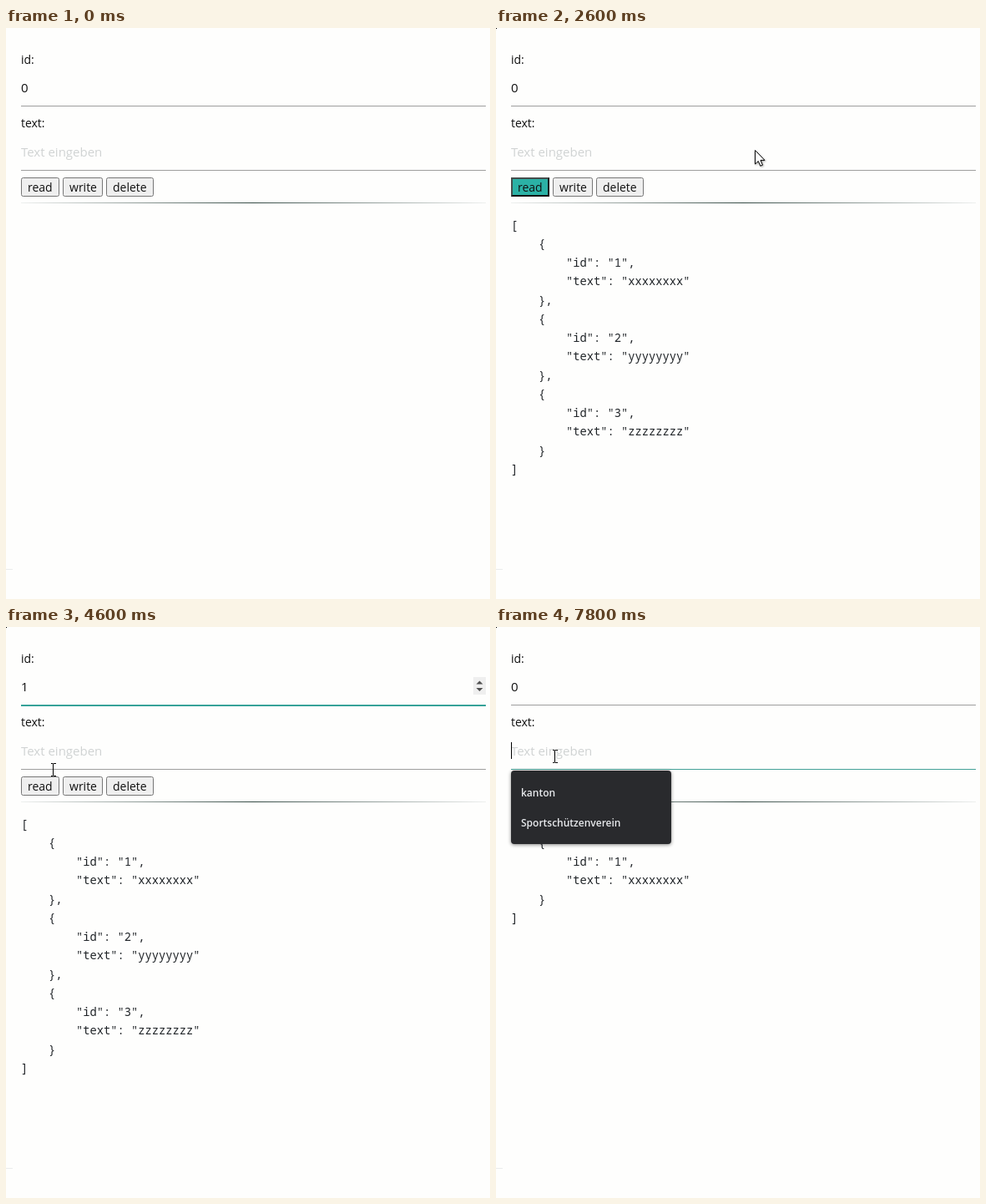
These frames come from a looping animation (580x684 px, 8000 ms). An HTML page:

```html
<!DOCTYPE html>
<html lang="de">
<head>
<meta charset="utf-8">
<title>Form demo</title>
<style>
html, body { margin: 0; width: 100%; height: 100%; overflow: hidden; background: #fefefd; }
.stage { position: relative; width: 580px; height: 684px; overflow: hidden; }
svg { position: absolute; left: 0; top: 0; }
text { font: 14px "Open Sans", "Noto Sans", sans-serif; fill: #111; }
.value { font-size: 15px; }
.hint { font-size: 15px; fill: #d0d3d3; }
.option { font-size: 12px; font-weight: 600; fill: #e8eaed; }
.button { fill: #efefef; stroke: #767676; }
pre {
  position: absolute; left: 18px; top: 224.5px; margin: 0;
  font: 13.75px/22.5px "Noto Sans Mono", "DejaVu Sans Mono", monospace; color: #212529;
}
.tail { top: 314.5px; }

/* Every state holds until the next key: 2.5% = 200 ms */
.anim { animation: 8s step-end infinite; }
.dot { animation-name: dot; }
.pressed { animation-name: pressed; }
.head { animation-name: head; }
.all { animation-name: all; }
.one { animation-name: one; }
.zero { animation-name: zero; }
.edited { animation-name: edited; }
.id-focus { animation-name: id-focus; }
.spin { animation-name: spin; }
.spin-up { animation-name: spin-up; }
.menu { animation-name: menu; }
.arrow { animation-name: arrow; }
.beam { animation-name: beam; }
.pointer { animation-name: move; }

@keyframes dot { 0%, 12.5% { visibility: hidden } 2.5%, 27.5%, 100% { visibility: visible } }
@keyframes pressed { 0%, 47.5%, 97.5%, 100% { visibility: hidden } 17.5%, 62.5% { visibility: visible } }
@keyframes head { 0% { visibility: hidden } 20%, 100% { visibility: visible } }
@keyframes all { 0%, 65%, 100% { visibility: hidden } 20% { visibility: visible } }
@keyframes one { 0% { visibility: hidden } 65%, 100% { visibility: visible } }
@keyframes zero { 0%, 65%, 100% { visibility: visible } 47.5% { visibility: hidden } }
@keyframes edited { 0%, 65%, 100% { visibility: hidden } 47.5% { visibility: visible } }
@keyframes id-focus { 0%, 62.5%, 100% { visibility: hidden } 47.5% { visibility: visible } }
@keyframes spin { 0%, 62.5%, 100% { visibility: hidden } 40% { visibility: visible } }
@keyframes spin-up { 0%, 50%, 100% { visibility: hidden } 40% { visibility: visible } }
@keyframes menu { 0% { visibility: hidden } 97.5%, 100% { visibility: visible } }
@keyframes arrow { 0%, 57.5%, 92.5%, 100% { visibility: hidden } 2.5%, 60% { visibility: visible } }
@keyframes beam { 0%, 60% { visibility: hidden } 57.5%, 92.5%, 100% { visibility: visible } }
@keyframes move {
  0%, 2.5% { transform: translate(163px, 179px) }
  5% { transform: translate(110px, 179px) }
  12.5% { transform: translate(74px, 181px) }
  15% { transform: translate(42px, 183px) }
  17.5%, 20% { transform: translate(34px, 184px) }
  22.5% { transform: translate(35px, 184px) }
  27.5% { transform: translate(64px, 187px) }
  30% { transform: translate(170px, 178px) }
  32.5% { transform: translate(310px, 146px) }
  35% { transform: translate(430px, 114px) }
  37.5% { transform: translate(520px, 86px) }
  40% { transform: translate(566px, 67px) }
  42.5% { transform: translate(573px, 66px) }
  47.5% { transform: translate(571px, 66px) }
  50% { transform: translate(440px, 106px) }
  52.5% { transform: translate(240px, 158px) }
  55% { transform: translate(110px, 184px) }
  57.5% { transform: translate(57px, 171px) }
  60% { transform: translate(46px, 184px) }
  62.5% { transform: translate(44px, 187px) }
  92.5% { transform: translate(63px, 165px) }
  95%, 100% { transform: translate(71px, 155px) }
}
</style>
</head>
<body>
<div class="stage">
  <svg width="580" height="684">
    <defs>
      <linearGradient id="fade">
        <stop offset="0" stop-color="#eef0ef"/>
        <stop offset=".5" stop-color="#344a44"/>
        <stop offset="1" stop-color="#eef0ef"/>
      </linearGradient>
    </defs>
    <rect class="anim dot" width="1" height="1" fill="#000"/>
    <rect y="648" width="8" height="1" fill="#eaecec"/>

    <text x="18" y="43">id:</text>
    <text class="value anim zero" x="18" y="77">0</text>
    <text class="value anim edited" x="18" y="77">1</text>
    <rect x="18" y="93" width="557" height="1" fill="#9e9e9e"/>
    <rect class="anim id-focus" x="18" y="93" width="557" height="2" fill="#36a299"/>
    <g class="anim spin">
      <rect x="560" y="60" width="15" height="21" fill="#efefef"/>
      <rect class="anim spin-up" x="560" y="60" width="15" height="11" fill="#cbcdce"/>
      <path d="M563.5 68.5l4-4 4 4zM563.5 73l4 4 4-4z" fill="#505050"/>
    </g>

    <text x="18" y="119">text:</text>
    <text class="hint" x="18" y="154">Text eingeben</text>
    <rect x="18" y="170" width="557" height="1" fill="#9e9e9e"/>

    <rect class="button" x="18.5" y="179.5" width="45" height="22" rx="2"/>
    <rect class="button" x="68.5" y="179.5" width="47" height="22" rx="2"/>
    <rect class="button" x="120.5" y="179.5" width="56" height="22" rx="2"/>
    <g class="anim pressed">
      <rect x="18" y="179" width="46" height="23" fill="#111"/>
      <path d="M18 202V179H64L62 181H20V200Z" fill="#454d4c"/>
      <rect x="20" y="181" width="42" height="19" fill="#2bb1a5"/>
    </g>
    <text x="26" y="196">read</text>
    <text x="76" y="196">write</text>
    <text x="128" y="196">delete</text>
    <rect x="18" y="209" width="557" height="1" fill="url(#fade)"/>
  </svg>

<pre class="anim head">[
    {
        "id": "1",
        "text": "xxxxxxxx"</pre>
<pre class="tail anim all">    },
    {
        "id": "2",
        "text": "yyyyyyyy"
    },
    {
        "id": "3",
        "text": "zzzzzzzz"
    }
]</pre>
<pre class="tail anim one">    }
]</pre>

  <svg width="580" height="684">
    <g class="anim menu">
      <rect x="18" y="170" width="557" height="1" fill="#43a197"/>
      <rect x="18" y="138" width="1" height="20" fill="#000"/>
      <rect x="18" y="172" width="192" height="88" rx="4" fill="#292a2d"
            style="filter: drop-shadow(0 1px 2px #0007)"/>
      <text class="option" x="30" y="203">kanton</text>
      <text class="option" x="30" y="239">Sportschützenverein</text>
    </g>
    <g class="anim pointer">
      <path class="anim arrow" d="M.5 .5V17L4.3 13.5 6.8 19.3 9.5 18.1 7 12.4H12Z"
            fill="#fff" stroke="#000" style="filter: drop-shadow(1px 1px 1px #0005)"/>
      <path class="anim beam" d="M-3 -7.5H-1L-.5 -7 0 -7.5H3M-.5 -7V7M-3 7.5H-1L-.5 7 0 7.5H3"
            fill="none" stroke="#000"/>
    </g>
  </svg>
</div>
</body>
</html>
```
